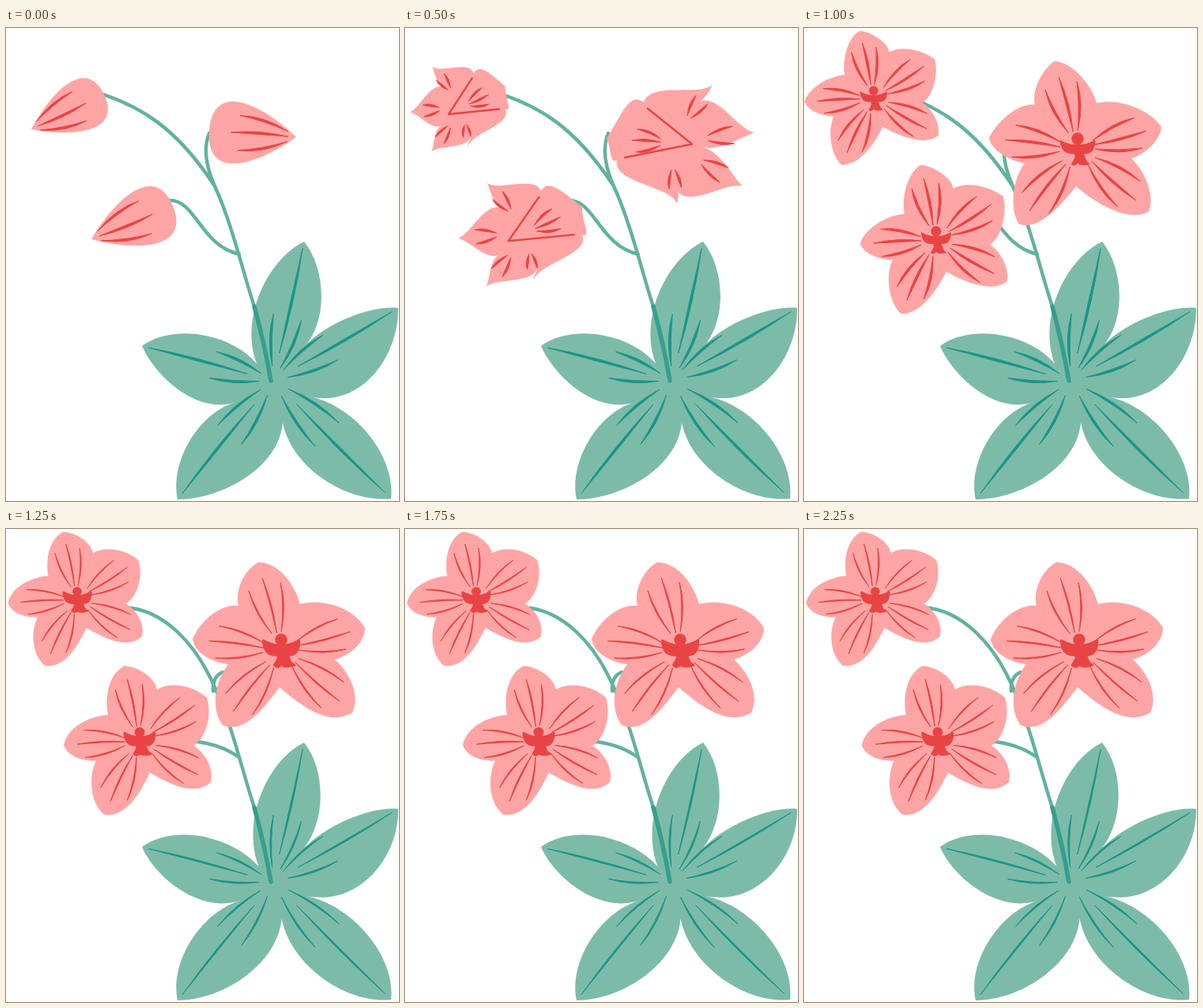
An HTML page that plays this animation: 497x598 px, repeating every 2.5 s.

```html
<!DOCTYPE html>
<html lang="en">
<head>
<meta charset="utf-8">
<title>Blooming flower</title>
<style>
html, body { margin: 0; width: 100%; height: 100%; overflow: hidden; background: #fff; }
svg { display: block; width: 497px; height: 598px; }
path { stroke-linecap: round; stroke-linejoin: round; }
</style>
</head>
<body>
<svg id="stage" viewBox="0 0 497 598"></svg>
<script>
const PINK = '#ffa5a5', RED = '#e94444', LEAF = '#7dbba9', VEIN = '#1a9688', STEM = '#62b29f', DARK_STEM = '#369f8e';
const STEP = 250;

// p moved by a along u and by b along s
const go = (p, u, a, s, b) => [p[0] + u[0] * a + s[0] * b, p[1] + u[1] * a + s[1] * b];
const mix = (p, q, k) => p.map((v, i) => v + (q[i] - v) * k);
const dist = (p, q) => Math.hypot(q[0] - p[0], q[1] - p[1]);
const xy = p => p.map(v => v.toFixed(1)).join();

// Length, direction and clockwise normal from one point to another
function axis(from, to) {
  const len = dist(from, to), u = [(to[0] - from[0]) / len, (to[1] - from[1]) / len];
  return { len, u, s: [-u[1], u[0]] };
}

const fill = (d, color, edge = 0) => `<path d="${d}" fill="${color}" stroke="${color}" stroke-width="${edge}"/>`;
const line = (d, color, width) => `<path d="${d}" fill="none" stroke="${color}" stroke-width="${width}"/>`;
const shift = (from, to, sx, sy, body) =>
  `<g transform="translate(${to}) scale(${sx} ${sy}) translate(${from.map(v => -v)})">${body}</g>`;

// Petals clockwise, each [tip x, tip y, next notch x, next notch y, lean]
function star({ center, petals, hood }, { base, tip, back }, pull = 0) {
  const notch = i => mix(petals.at(i % petals.length).slice(2, 4), center, pull);
  let d = `M${xy(notch(-1))}`;
  petals.forEach(([x, y, , , lean = 0], i) => {
    const top = [x, y], { u, s } = axis(center, top);
    const b = i === hood ? .2 : base, r = i === hood ? .45 : tip;
    const bend = (n, side) => {
      const len = dist(n, top), k = side * (1 + side * lean) * len;
      return [go(n, u, .3 * len, s, b * k), go(top, u, -back * len, s, r * k)].map(xy);
    };
    const [a1, a2] = bend(notch(i - 1), -1), [b1, b2] = bend(notch(i), 1);
    d += `C${a1} ${a2} ${xy(top)}C${b2} ${b1} ${xy(notch(i))}`;
  });
  return d + 'Z';
}

// Tapered strokes fanning out from center towards tip
function veins(center, tip, { from, to, spread, offsets = [-1, 0, 1] }, color, width) {
  const { len, u, s } = axis(center, tip);
  return offsets.map(o => {
    const a = go(center, u, from * len, s, o * spread * len * .3);
    const b = go(center, u, to * (1 - .12 * Math.abs(o)) * len, s, o * spread * len);
    const mid = go(mix(a, b, .5), u, 0, s, (o || .5) * spread * len * .3);
    const edge = k => xy(go(mid, u, 0, s, k * width));
    return fill(`M${xy(a)}Q${edge(1)} ${xy(b)}Q${edge(-1)} ${xy(a)}Z`, color, 1);
  }).join('');
}

const foliage = {
  center: [338, 446],
  petals: [[377, 270, 373, 408], [496, 354, 384, 466, .4], [487, 595, 350, 499], [217, 596, 290, 473], [172, 402, 317, 424]]
};
const stemsA = ['M123 84C170 100 215 125 264 200', 'M257 133Q246 160 264 200', 'M205 218C240 215 245 275 295 286'];
const stemsB = ['M150 99C200 102 240 145 264 200', 'M274 181Q261 186 262 205', 'M232 268Q268 270 294 288'];

function plant(pose, stems) {
  const width = pose ? 2 : 3;
  const ribs = foliage.petals.map(p =>
    veins(foliage.center, p, { from: .2, to: .95, spread: .08, offsets: [0] }, VEIN, width) +
    veins(foliage.center, p, { from: .1, to: .52, spread: .1, offsets: [-1, 1] }, VEIN, width));
  return fill(star(foliage, { base: .2, tip: .25, back: .2 }, pose * .12), LEAF) + ribs.join('') +
    line(stems.join('') + 'M264 200C285 245 300 310 314 352', STEM, 4.4) +
    line('M314 352Q327 400 335 446', DARK_STEM, 5.5);
}

function bud(stem, tip, w) {
  const { len, u, s } = axis(stem, tip);
  const near = k => xy(go(stem, u, 0, s, k * w * 1.6)), far = k => xy(go(tip, u, -.4 * len, s, k * w * .9));
  return fill(`M${xy(stem)}C${near(1)} ${far(1)} ${xy(tip)}C${far(-1)} ${near(-1)} ${xy(stem)}Z`, PINK) +
    veins(tip, stem, { from: .1, to: .75, spread: .2 }, RED, 3);
}
const buds = () => bud([124, 84], [32, 128], 34) + bud([257, 130], [367, 138], 41) + bud([211, 225], [108, 267], 38);

const cups = {
  right: { center: [335, 145], hood: 4,
    petals: [[389, 72, 373, 93], [442, 132, 377, 151], [427, 200, 345, 207], [344, 222, 268, 167], [255, 140, 302, 94]] },
  low: { center: [155, 258], hood: 1,
    petals: [[104, 196, 172, 206], [224, 226, 224, 262], [163, 320, 168, 303], [103, 327, 118, 287], [67, 266, 120, 227]] }
};
const halves = {
  right: { center: [330, 139], hood: 4,
    petals: [[330, 36, 372, 98], [447, 108, 421, 160], [420, 242, 346, 203], [320, 252, 270, 177], [255, 130, 298, 91]] },
  low: { center: [162, 255], hood: 1,
    petals: [[134, 177, 183, 207], [239, 240, 232, 272], [200, 332, 182, 308], [117, 353, 116, 292], [73, 274, 130, 233]] }
};
const blooms = {
  right: { center: [346, 153],
    petals: [[317, 42, 370, 95], [452, 125, 414, 165], [436, 232, 344, 200], [272, 248, 279, 171], [234, 139, 292, 97]] },
  low: { center: [167, 268],
    petals: [[148, 173, 189, 203], [252, 213, 235, 274], [257, 320, 180, 308], [122, 361, 112, 293], [71, 273, 127, 235]] }
};

// Fold between the hood and the front petals
function fold({ center, petals, hood }, depth, width) {
  const side = i => mix(petals.at(i).slice(2, 4), center, .15);
  const corner = mix(center, petals[hood], depth);
  return line(`M${xy(side(hood - 1))}L${xy(corner)}L${xy(side(hood))}`, RED, width);
}

function cup(f, width) {
  return fill(star(f, { base: .1, tip: .06, back: .25 }), PINK) +
    f.petals.map((p, i) => i === f.hood
      ? veins(f.center, p, { from: .15, to: .6, spread: .18 }, RED, width)
      : veins(f.center, p, { from: .45, to: .85, spread: .1, offsets: [-1, 1] }, RED, width)).join('') +
    fold(f, -.35, width * .8);
}
function half(f) {
  const spokes = [-140, -80, -10, 50, 120].map(deg => {
    const t = deg * Math.PI / 180;
    return `M${xy(f.center)}l${xy([Math.cos(t) * 11, Math.sin(t) * 11])}`;
  });
  return fill(star(f, { base: .05, tip: .24, back: .1 }), PINK) +
    f.petals.map((p, i) => i === f.hood ? '' : veins(f.center, p, { from: .2, to: .82, spread: .17 }, RED, 3)).join('') +
    fold(f, .25, 2.4) + line(spokes.join(''), RED, 7);
}
function bloom(f, pose, size) {
  const heart = 'M-19-10Q-9-4 0-5Q9-4 19-10Q19 6 7 5Q10 16 14 16Q4 19 0 15Q-3 20-7 16Q0 6-5 5Q-18 6-19-10Z';
  return fill(star(f, { base: 0, tip: .3 + pose * .06, back: .1 }), PINK) +
    f.petals.map(p => veins(f.center, p, { from: .2, to: .82, spread: .18 }, RED, pose ? 1.6 : 3)).join('') +
    shift([0, 0], f.center, size, size, fill(heart, RED, pose * 3) + `<circle cy="-11" r="6.5" fill="${RED}"/>`);
}

// The left flower is a smaller copy of the low one
const cupSet = width => [
  shift([67, 190], [6, 44], .77, .82, cup(cups.low, width * 1.25)), cup(cups.right, width), cup(cups.low, width)
];
const halfSet = () => shift([162, 255], [92, 90], .9, .83, half(halves.low)) + half(halves.right) + half(halves.low);
const bloomSet = pose => shift([0, 0], [pose * 2, 0], 1, 1,
  shift([167, 268], [88, 89], .91, .9, bloom(blooms.low, pose, 1)) +
  bloom(blooms.right, pose, 1.18) + bloom(blooms.low, pose, 1));

function openingSet() {
  const anchors = [[128, 85], [255, 142], [222, 222]];
  return cupSet(2).map((c, i) => shift(anchors[i], anchors[i], .96, .86, c)).join('');
}

const scenes = [
  plant(0, stemsA) + buds(),
  plant(1, stemsA) + openingSet(),
  plant(0, stemsA) + cupSet(3).join(''),
  plant(1, stemsB) + halfSet(),
  plant(0, stemsA) + bloomSet(0),
  plant(1, stemsB) + bloomSet(1)
];
const order = [0, 1, 2, 3, 4, 5, 4, 5, 4, 5];

const stage = document.getElementById('stage');
stage.innerHTML = scenes.map(s => `<g display="none">${s}</g>`).join('');
const groups = [...stage.children];
const start = performance.now();
function tick() {
  const now = order[Math.floor((performance.now() - start) / STEP) % order.length];
  groups.forEach((g, i) => g.setAttribute('display', i === now ? 'inline' : 'none'));
  requestAnimationFrame(tick);
}
tick();
</script>
</body>
</html>
```
